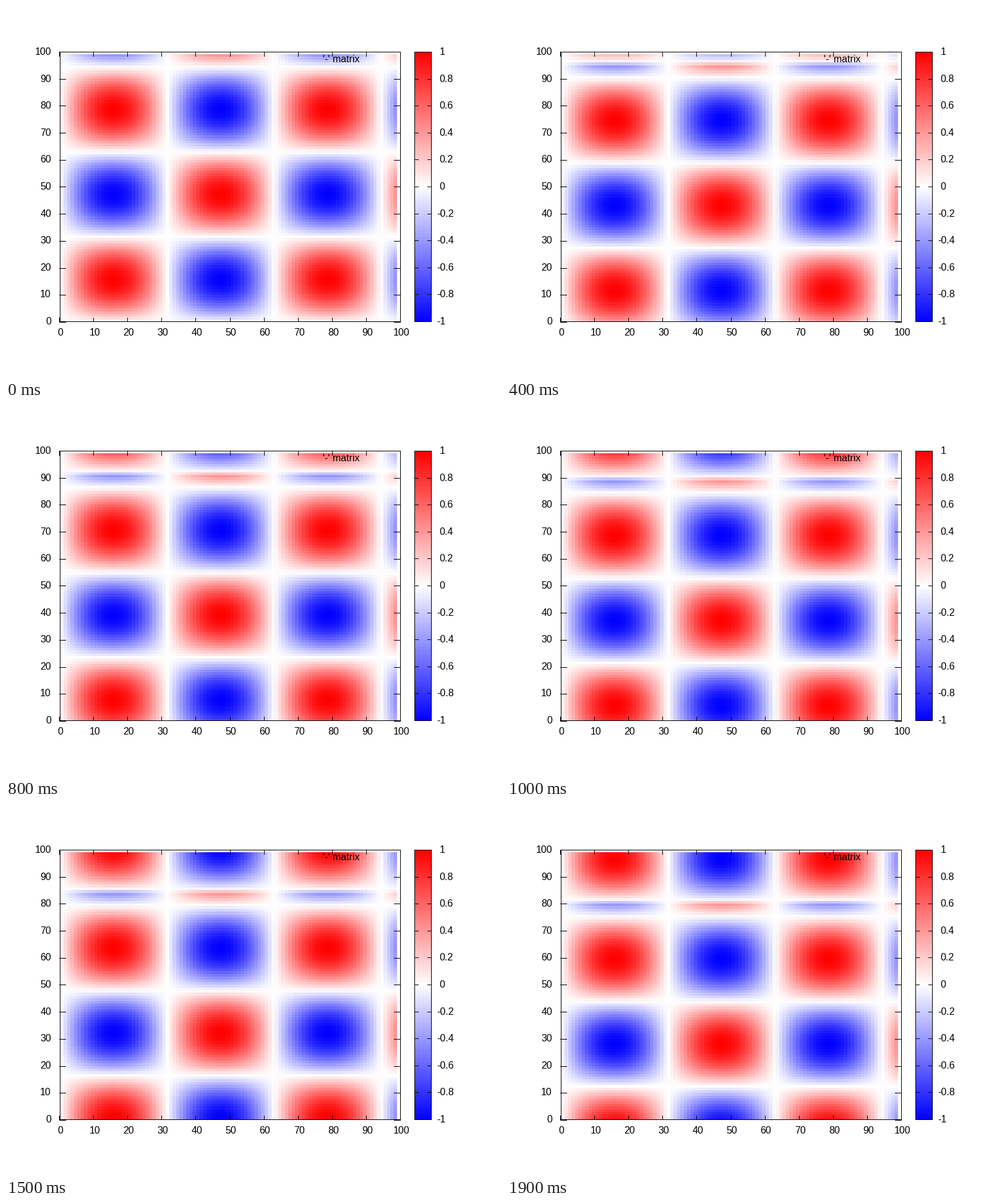
These frames come from a looping animation (800 px wide and 600 px high, 2000 ms). A matplotlib script:

```python
import numpy as np
import matplotlib.pyplot as plt
from matplotlib.animation import FuncAnimation
from matplotlib.patches import Rectangle

W, H, DPI = 800, 600, 100
FRAMES, INTERVAL = 20, 100
LEFT, RIGHT, TOP, BOTTOM = 87, 637, 74, 510
BAR_LEFT, BAR_RIGHT = 660, 687

plt.rcParams["font.family"] = "Liberation Sans"
fig = plt.figure(figsize=(W / DPI, H / DPI), dpi=DPI, facecolor="white")
ax = fig.add_axes([0, 0, 1, 1])
ax.axis("off")


def colors(v):
    """Blue - white - red for values from -1 to 1."""
    v = np.clip(v, -1, 1)
    return np.stack([1 + np.minimum(v, 0), 1 - np.abs(v), 1 - np.maximum(v, 0)], axis=-1)


def box(x0, y0, x1, y1):
    """Fill whole pixels, both ends included."""
    ax.add_patch(Rectangle((x0, y0), x1 - x0 + 1, y1 - y0 + 1,
                           fc="black", lw=0, antialiased=False, zorder=3))


def border(x0, y0, x1, y1):
    for y in (y0, y1):
        box(x0, y, x1, y)
    for x in (x0, x1):
        box(x, y0, x, y1)


def label(x, y, s, ha):
    ax.text(x, y, s, ha=ha, va="baseline", fontsize=16 * 72 / DPI,
            color="black", zorder=4)


def show(rgb, extent):
    return ax.imshow(rgb, extent=extent, origin="lower", aspect="auto",
                     interpolation="nearest", zorder=1)


wave = np.sin(np.arange(100) / 10)
grid = np.outer(wave, wave)


def cells(shift):
    """Mean of the four corners of each cell, rows rolled downwards."""
    z = np.roll(grid, -shift, axis=0)
    return colors((z[1:, 1:] + z[1:, :-1] + z[:-1, 1:] + z[:-1, :-1]) / 4)


surface = show(cells(0), (88, 632, 511, 78))
show(colors(np.linspace(-1, 1, 128))[:, None], (BAR_LEFT, BAR_RIGHT + 1, BOTTOM + 1, TOP))
ax.set_xlim(0, W)
ax.set_ylim(H, 0)

border(LEFT, TOP, RIGHT, BOTTOM)
border(BAR_LEFT, TOP, BAR_RIGHT, BOTTOM)

for k in range(11):
    x = int(86.5 + 55.1 * k)
    y = round(511 - 43.7 * k)
    box(x, TOP, x, TOP + 7)
    box(x, BOTTOM - 6, x, BOTTOM)
    box(LEFT - 1, y, LEFT + 9, y)
    box(RIGHT - 10, y, RIGHT, y)
    label(88.3 + 55.05 * k, 533, str(10 * k), "center")
    label(73, 515 - 43.6 * k, str(10 * k), "right")

    y = int(510.5 - 43.6 * k)
    box(BAR_LEFT, y, BAR_LEFT + 6, y)
    box(BAR_RIGHT - 6, y, BAR_RIGHT, y)
    value = (k - 5) / 5
    label(696 if value < 0 else 700.4, 515 - 43.6 * k, f"{value:g}", "left")

label(571, 91, "'-' matrix", "right")


def update(i):
    surface.set_data(cells(i))
    return [surface]


anim = FuncAnimation(fig, update, frames=FRAMES, interval=INTERVAL,
                     repeat=True, repeat_delay=0, blit=False)
plt.show()
```
